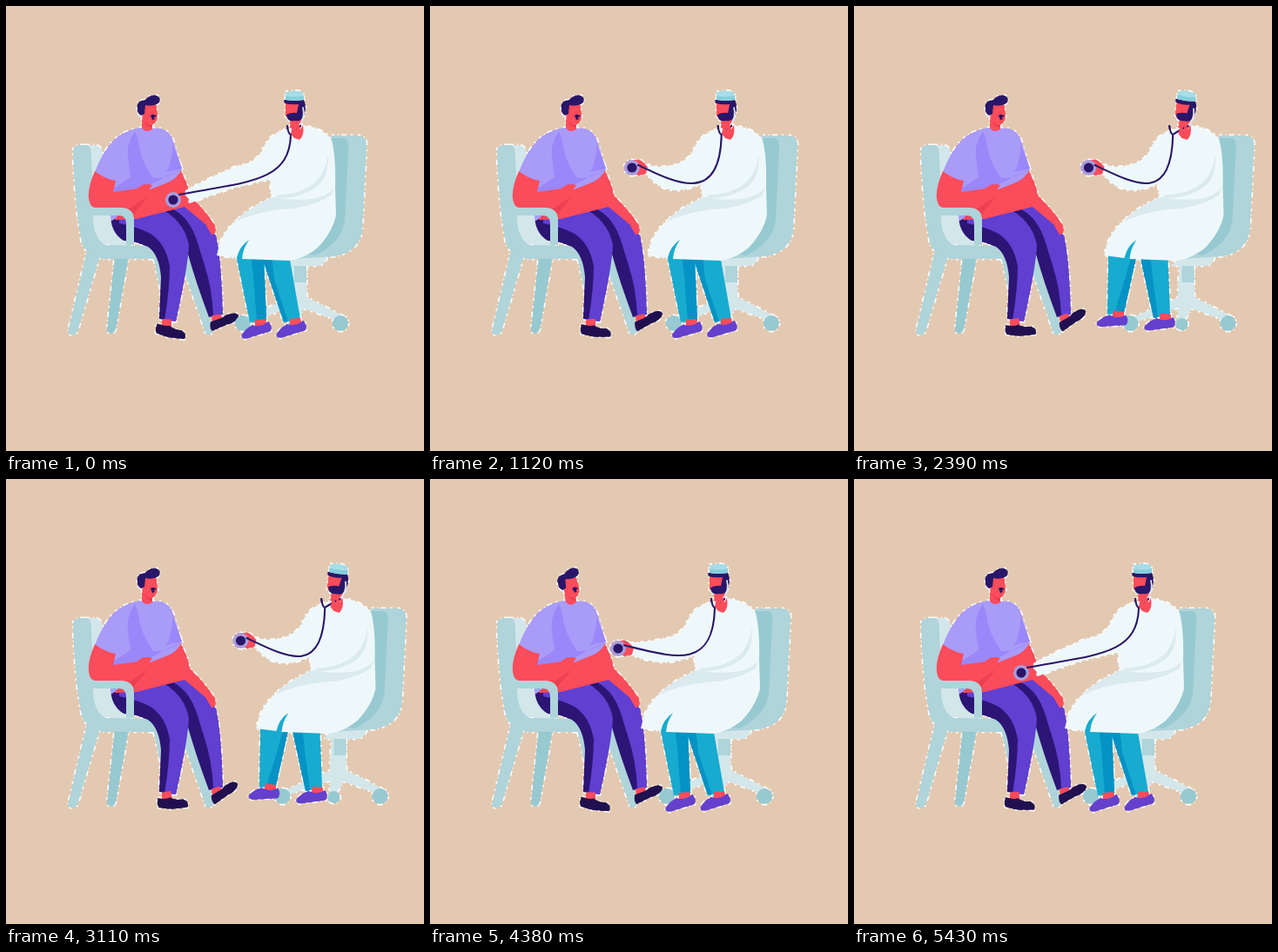
These frames come from a looping animation (480 by 512 pixels, 5.46 s). An HTML page:

```html
<!DOCTYPE html>
<html lang="en">
<head>
<meta charset="utf-8">
<title>Check-up</title>
<style>
html,body{margin:0;width:100%;height:100%;overflow:hidden;background:#e3c9b1}
svg{display:block;width:100%;height:100%}
.halo{stroke:#fff;stroke-width:3;stroke-dasharray:3 4 1 3 6 5 2 6}
.red{fill:#fb4c5b}.redShade{fill:#ec4052}
.ink{fill:#2a1668}.shoe{fill:#20104f}
.shirt{fill:#a99bf8}.fold{fill:#9a87fa}
.pant{fill:#603fd1}.pantShade{fill:#2c1575}
.seat{fill:#afd4da}.seatLight{fill:#d3e7eb}.seatDark{fill:#97c9d1}
.coat{fill:#eef8fa}.coatShade{fill:#dbeaee}
.leg{fill:#17abd0}.legShade{fill:#0592c4}.boot{fill:#6440cd}
.line{fill:none;stroke-linecap:round;stroke-linejoin:round}
</style>
</head>
<body>
<svg viewBox="0 0 480 512" preserveAspectRatio="none">
<use href="#man" class="halo"/>
<use href="#doc" class="halo"/>

<g id="man">
  <!-- chair -->
  <path class="seat" d="M93 282L109 283L82 375Q78 381 72 377Q71 375 72 371Z"/>
  <path class="seatDark" d="M125 287L141 287L126 372Q122 380 116 374Z"/>
  <path class="seat" d="M168 284L214 284L238 371Q238 379 230 378L206 309L199 340L178 330Z"/>
  <path class="seatLight" d="M93 160H104Q110 162 111 170L120 236L143 278L102 272Z"/>
  <path class="seat" d="M77 166Q78 160 85 160H94Q98 163 98 172L101 250Q103 270 114 275L172 276L176 291H113Q92 288 87 272Q79 232 77 166Z"/>
  <!-- trousers -->
  <path class="pantShade" d="M119 245L138 240L182 258L190 300L187 362L176 360L178 312Q176 286 163 277Q148 270 134 270Q121 260 119 245Z"/>
  <path class="pant" d="M202 226Q229 249 241 264Q247 287 249 355L234 358L221 300L178 236Z"/>
  <path class="pantShade" d="M176 237L190 233C215 245 219 270 227 295Q237 325 238 356L233 358Q217 315 208 282Z"/>
  <path class="pant" d="M130 246L181 235Q205 249 210 275Q209 300 195 363L182 362Q188 325 188 300Q184 274 166 262Q148 253 130 250Z"/>
  <!-- shoes -->
  <g id="farFoot"><path class="red" d="M237 356L246 355L250 361L236 364Z"/>
    <path class="shoe" d="M235 363L248 359Q254 354 263 354Q268 355 267 359Q264 365 253 367L236 374Q233 369 235 363Z"/></g>
  <g id="nearFoot"><path class="red" d="M180 360L190 361L190 369L178 368Z"/>
    <path class="shoe" d="M174 365Q181 369 188 368Q192 373 202 374Q208 379 204 384L185 381L172 376Q171 370 174 365Z"/></g>
  <!-- torso -->
  <path class="red" d="M198 185Q208 201 211 218Q232 239 240 253Q242 263 236 263L229 251L205 231L150 245L126 246L120 241L134 215L187 200Z"/>
  <path class="shirt" d="M154 140L178 141Q190 145 193 158L202 187Q197 200 181 205L137 222Q132 244 119 248L124 210Q110 202 102 191Q110 169 124 154Q136 143 154 140Z"/>
  <path class="fold" d="M148 144Q138 158 140 175L143 197L123 210L122 220L163 207L200 188Q184 200 169 198Q153 176 152 155Z"/>
  <path class="fold" d="M191 158Q192 177 184 191L202 187Z"/>
  <path class="red" d="M102 190Q113 199 126 201L123 214L151 210Q157 203 168 206L164 212L168 214L158 220L143 229L128 239Q108 237 98 230Q90 218 102 190Z"/>
  <path class="redShade" d="M126 244L145 231L163 219L168 212L159 224L143 243Z"/>
  <!-- armrest -->
  <path class="seatLight" d="M100 239H120Q120 263 137 271L112 272Q99 264 100 239Z"/>
  <path class="seat" d="M95 232H133Q147 233 147 246V275H138V250Q138 241 129 241H96Z"/>
  <!-- head -->
  <g id="manHead">
    <path class="red" d="M157 113L172 111L174 127Q173 134 168 137L168 142Q160 147 156 140Z"/>
    <path class="redShade" d="M158 130Q160 137 168 137L168 140Q160 140 158 130Z"/>
    <path class="ink" d="M151 119Q149 109 160 108Q165 102 173 103Q179 106 175 112Q169 116 160 114L159 124L155 126Q151 124 151 119Z"/>
    <path class="ink" d="M166 126Q169 123 173 127L170 128Q172 131 168 131Z"/>
  </g>
</g>

<g id="doc">
  <g class="slide">
    <path class="seatLight" d="M329 287H369Q367 299 357 299H345V325L346 343H326L328 299H320Z"/>
    <path class="seat" d="M331 299H345V318H331Z"/>
    <path class="seatLight" d="M328 335L345 335L390 358L388 364L342 348L334 362L326 362L327 347L277 364L273 359Z"/>
    <g class="seatDark"><circle cx="384" cy="365" r="9"/><circle cx="272" cy="365" r="9"/><circle cx="331" cy="366" r="7"/></g>
    <path class="seat" d="M374 149H405Q414 150 414 160L409 258Q406 282 378 288L330 291Z"/>
    <path class="seatDark" d="M373 152H388Q394 153 393 164L389 246Q386 272 355 287L345 285Z"/>
  </g>
  <path id="legR" class="leg"/><path id="legRS" class="legShade"/>
  <path id="legL" class="leg"/><path id="legLS" class="legShade"/>
  <g id="footR"><use href="#slipper" x="40" y="-1"/></g>
  <g id="footL"><g id="slipper"><path class="red" d="M286 361L298 360L300 368L286 369Z"/>
    <path class="boot" d="M283 367Q293 370 301 363Q306 367 304 374L275 383Q269 382 271 378Q275 371 283 367Z"/></g></g>
  <g class="slide">
    <path class="coat" d="M318 143L339 137Q364 140 374 154Q379 174 378 207L379 241Q375 260 358 278Q344 290 326 293L271 291Q272 279 279 269Q268 276 265 290L242 287Q247 261 262 249Q282 232 305 222L303 195L298 169Q306 147 318 143Z"/>
    <path class="coatShade" d="M378 207Q372 218 351 222Q322 224 306 220Q277 233 263 248Q289 237 316 234Q349 233 373 218Z"/>
    <path class="coatShade" d="M369 170Q368 197 346 209Q329 218 313 217L307 222Q340 221 358 207Q372 194 369 170Z"/>
    <path id="sleeve" class="coat"/>
    <g id="docHead">
      <path class="red" d="M321 111L339 112L339 139Q332 144 326 140L327 130L321 127Z"/>
      <path class="ink" d="M319 108H342Q346 118 341 128Q339 133 332 132Q323 134 322 125Q328 122 334 123L336 113Q327 114 320 112Z"/>
      <path d="M321 99Q331 96 341 99L342 108Q331 110 321 108Z" fill="#a8dde7"/>
      <path d="M321 103Q331 106 342 103L342 108Q331 110 321 108Z" fill="#86cfdc"/>
      <path class="line" d="M341 117Q344 128 337 137" stroke="#d9e5f2" stroke-width="1.8"/>
    </g>
    <g id="gear">
      <path class="red" d="M-2 -7Q5 -11 11 -8L18 -1L16 7L7 9L0 5Z"/>
      <circle r="9" fill="#ab9cdb"/><circle r="5.6" class="ink"/>
    </g>
    <path id="tube" class="line" stroke="#2a1668" stroke-width="2.1"/>
    <path class="red" d="M328 142L330 136L333 143L335 133L338 142L341 137Q343 149 337 154L331 152L327 147Z"/>
  </g>
</g>
</svg>
<script>
const LOOP = 5460, HOLD = 480, STEP = 71, TAP = 346;
const $ = id => document.getElementById(id);
const slides = document.querySelectorAll('.slide');
const move = (el, value) => el.setAttribute('transform', value);
const shape = (id, d) => $(id).setAttribute('d', d);
const poly = (id, ...pts) => shape(id, 'M' + pts.join('L') + 'Z');

// still at first, then the picture changes in even steps
const snap = t => t < HOLD ? HOLD : HOLD + STEP * Math.floor((t - HOLD + 22) / STEP);

function ramp(t, from, to) {
  const u = Math.min(1, Math.max(0, (t - from) / (to - from)));
  return u * u * (3 - 2 * u);
}
// rises from a to b, falls from c to d
const pulse = (t, a, b, c, d) => ramp(t, a, b) - ramp(t, c, d);

function drawLegs(slide, away, tap) {
  const lx = Math.min(slide, 11), rx = Math.min(slide, 25);
  const kl = (slide + lx) / 2, kr = (slide + rx) / 2;
  const ly = -9 * away * away, ry = -5 * away * away;
  const peak = [279 + slide, 267], ankleL = [299 + lx, 362 + ly], ankleR = [319 + rx, 364 + ry];
  poly('legL', [264 + kl, 285], peak, [296 + kl, 288], ankleL, [280 + lx, 364 + ly]);
  poly('legLS', peak, [296 + kl, 288], ankleL, [288 + lx, 363 + ly], [284 + kl, 310]);
  poly('legR', [293 + kr, 286], [325 + kr, 286], [338 + rx, 360 + ry], ankleR);
  poly('legRS', [293 + kr, 286], [305 + kr, 286], [308 + kr, 315], [324 + rx, 363 + ry], ankleR);
  move($('footL'), `translate(${lx} ${ly}) rotate(${14 * tap * away} 294 365)`);
  move($('footR'), `translate(${rx} ${ry}) rotate(${10 * tap * away} 334 364)`);
}

function drawScope(out, touch, nod) {
  const x = 192 + 32 * out - 8 * touch, y = 223 - 37 * out + 9 * touch;
  const up = (223 - y) / 37, low = 1 - up, end = 327 - nod * .9;
  const wx = x + 16, wy = y + 2 - 6 * low;
  shape('sleeve', `M318 144Q301 148 294 167Q286 181 266 184Q250 ${187 + 3 * low} ${wx - 2 * low} ${wy - 7}` +
    `Q${wx - 4} ${wy + 4} ${wx + 3} ${wy + 8}Q260 ${208 + 8 * up} 283 ${204 + 7 * up}Q302 ${200 + 8 * up} 318 195Z`);
  move($('gear'), `translate(${x} ${y})`);
  shape('tube', `M${x + 7} ${y - 6 + 3 * up}C${279 - 2 * up} ${202 + 3 * up} ${end - 2} ${202 + 26 * up} ${end} 149` +
    `M${end - 4} 138Q${end - 3} 147 ${end} 148Q${end + 4} 145 338 138`);
}

function draw(now) {
  const t = snap(now % LOOP);
  const tap = .5 + .5 * Math.cos(2 * Math.PI * (t - 690) / TAP);
  const away = pulse(t, 970, 1530, 3260, 3830);
  const nod = 7 * pulse(t, 970, 2200, 3600, 3900);
  const out = pulse(t, 600, 1040, 4940, LOOP);
  const touch = pulse(t, 3830, 4200, 4940, LOOP);
  const slide = 45.5 * away;

  slides.forEach(el => move(el, `translate(${slide} 0)`));
  move($('manHead'), `rotate(${-10 * pulse(t, 3830, 4300, 4430, 4940)} 165 141)`);
  move($('docHead'), `rotate(${nod} 331 146)`);
  move($('nearFoot'), `rotate(${-15 * tap} 182 364)`);
  move($('farFoot'), `rotate(${-14 * tap} 240 360)`);
  drawLegs(slide, away, tap);
  drawScope(out, touch, nod);
}

const begin = performance.now();
function tick() {
  draw(performance.now() - begin);
  requestAnimationFrame(tick);
}
tick();
</script>
</body>
</html>
```
